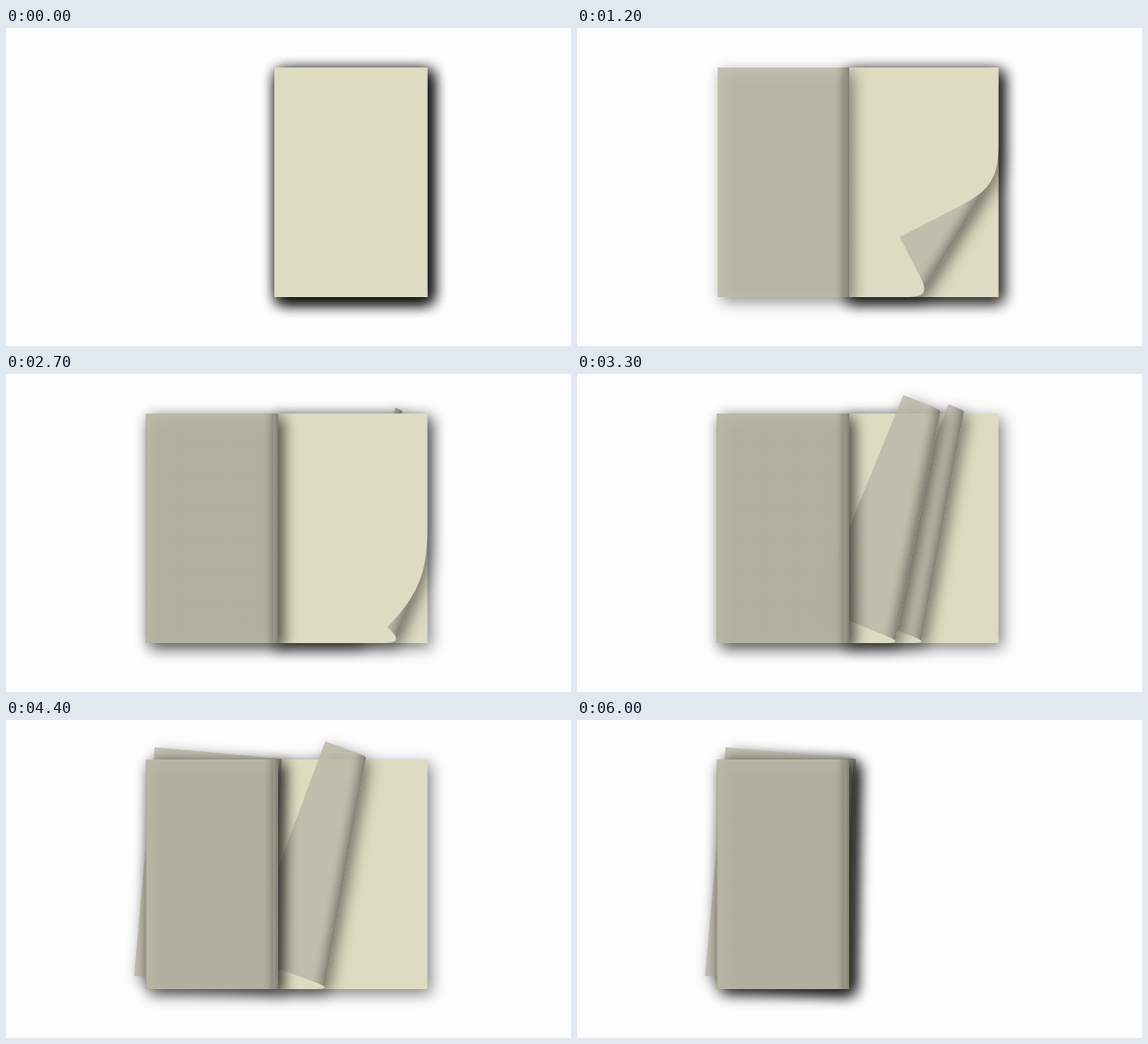
Animation of 600x338 px, one loop 10000 ms. Source, as an HTML page with a canvas:

```html
<!DOCTYPE html>
<html>
<head>
<meta charset="utf-8">
<title>Turning pages</title>
<style>
  html, body { margin: 0; width: 100%; height: 100%; overflow: hidden; background: #fdfdfe; }
  canvas { display: block; width: 100%; height: 100%; }
</style>
</head>
<body>
<canvas id="stage" width="600" height="338"></canvas>
<script>
const W = 600, H = 338, LOOP = 10000, STEP = 100;
const LEFT = 285, TOP = 42, RIGHT = 447.5, BOTTOM = 286, CURL = 16.5;

const stage = document.getElementById('stage').getContext('2d');
const sheet = document.createElement('canvas');
sheet.width = W;
sheet.height = H;
const ink = sheet.getContext('2d');

// From the top of the pile down. Each fold moves by [from, to, power]:
// x is its place at the top edge, lean how far left it is at the bottom edge.
const pages = [
  { start: 0, end: 1100, x: [466, 289, 1], lean: [0, 0, 1] },
  { start: 500, end: 2550, x: [730, 288.5, 1.62], lean: [225, 0, 1] },
  { start: 2300, end: 4150, x: [614, 293, 1.6], lean: [139, 11, 1.6] },
  { start: 1300, end: 5000, x: [438, 296, 0.276], lean: [46, 5, 0.03] },
  { start: 5400, end: 6000, x: [640, 296, 1], lean: [170, 5, 1] }
];

const outline = [];
function addEdge(x0, y0, x1, y1) {
  const n = Math.hypot(x1 - x0, y1 - y0) * 3;
  for (let i = 0; i < n; i++) outline.push([x0 + (x1 - x0) * i / n, y0 + (y1 - y0) * i / n]);
}
addEdge(LEFT, TOP, RIGHT, TOP);
addEdge(RIGHT, TOP, RIGHT, BOTTOM);
addEdge(RIGHT, BOTTOM, LEFT, BOTTOM);
addEdge(LEFT, BOTTOM, LEFT, TOP);

const ease = ([from, to, power], left) => to + (from - to) * left ** power;

function fillShape(points, paint) {
  ink.beginPath();
  points.forEach(p => ink.lineTo(p[0], p[1]));
  ink.fillStyle = paint;
  ink.fill();
}

function backPaint(ux, uy, fold) {
  const inner = fold - CURL;
  const g = ink.createLinearGradient(ux * fold, uy * fold, ux * inner, uy * inner);
  for (let i = 0; i <= 10; i++) {
    const light = 0.6 + 0.4 * Math.sin(i / 10 * Math.PI / 2);
    g.addColorStop(i / 10, `rgba(${187 * light},${185 * light},${168 * light},.87)`);
  }
  return g;
}

// Wraps the page around a cylinder lying along the fold.
function drawPage(page, t) {
  const left = Math.max(0, (page.end - t) / (page.end - page.start));
  const x = t < page.start ? W : ease(page.x, left);
  const lean = t < page.start ? 0 : ease(page.lean, left);
  const len = Math.hypot(BOTTOM - TOP, lean);
  const ux = (BOTTOM - TOP) / len, uy = lean / len;
  const fold = ux * x + uy * TOP;
  const front = [], back = [], half = Math.PI * CURL;
  for (const [px, py] of outline) {
    const d = ux * px + uy * py - fold + CURL;
    const to = d < 0 ? d : d < half ? CURL * Math.sin(d / CURL) : half - d;
    (d <= half / 2 ? front : back).push([px + ux * (to - d), py + uy * (to - d)]);
  }
  ink.clearRect(0, 0, W, H);
  fillShape(front, '#dddcc2');
  if (back.length) fillShape(back, backPaint(ux, uy, fold));
  stage.drawImage(sheet, 0, 0);
}

function frame(now) {
  const t = Math.floor(now % LOOP / STEP) * STEP;
  stage.shadowColor = 'transparent';
  stage.fillStyle = '#fdfdfe';
  stage.fillRect(0, 0, W, H);
  stage.shadowColor = 'rgba(0,0,0,.49)';
  stage.shadowBlur = 16;
  stage.shadowOffsetX = 4;
  stage.shadowOffsetY = 5;
  for (const page of [...pages].reverse()) drawPage(page, t);
  requestAnimationFrame(() => frame(performance.now() - start));
}

const start = performance.now();
frame(0);
</script>
</body>
</html>
```
